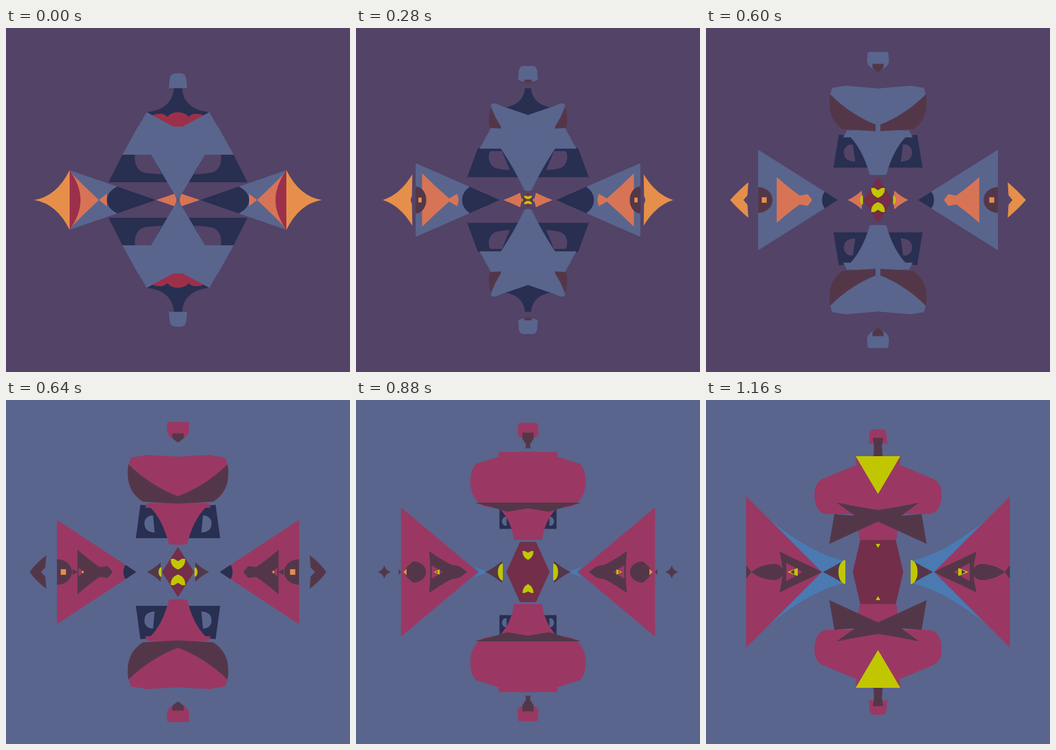
Write an HTML page with a canvas that moves like this. It is 600 by 600 pixels and loops after 1200 ms.

```html
<!DOCTYPE html>
<html>
<head>
<meta charset="utf-8">
<style>
html, body { margin: 0; width: 100%; height: 100%; overflow: hidden; background: #534367; }
canvas { display: block; width: 100vw; height: 100vh; }
</style>
</head>
<body>
<canvas id="stage" width="600" height="600"></canvas>
<script>
const ctx = document.getElementById('stage').getContext('2d');
const LOOP = 1200, STEP = 40, SWAP = 640, MID = 720, END = 1160;

const PURPLE = '#534367', BLUE = '#59658d', NAVY = '#282f51', CRIMSON = '#9c304b',
  ORANGE = '#e68f4b', SALMON = '#d77456', BROWN = '#533749', WINE = '#732e49',
  YELLOW = '#c0c700', SKY = '#4a7ab1', MAGENTA = '#9a3863';

let t = 0;
const clamp = k => Math.max(0, Math.min(1, k));
const mix = (a, b, k) => a + (b - a) * k;

// Value now, going from a through b at MID to c: slow start, slow end.
const m = (a, b, c) => t < MID
  ? mix(a, b, (t / MID) ** 1.4)
  : mix(b, c, 1 - (1 - (t - MID) / (END - MID)) ** 1.25);

// Fills a shape in all four quadrants; x, y run right and up from the centre.
// Two numbers make a line, four a quadratic and six a cubic curve.
function fill(color, ...parts) {
  ctx.fillStyle = color;
  for (const sx of [1, -1]) for (const sy of [1, -1]) {
    ctx.setTransform(sx, 0, 0, sy, 300, 300);
    ctx.beginPath();
    for (const p of parts) {
      if (p.length === 2) ctx.lineTo(...p);
      else if (p.length === 4) ctx.quadraticCurveTo(...p);
      else ctx.bezierCurveTo(...p);
    }
    ctx.fill();
  }
}
const tri = (color, tip, base, h) => fill(color, [tip, 0], [base, h], [base, 0]);
const round = (x, y, end) => [mix(x, end, .55), y, end, y * .55, end, 0];

function wings(main, flesh) {
  const k = clamp((t - MID) / (END - MID)) ** 2, root = mix(78, 60, k);
  fill(SKY, [root, 0], [root, 20 * k],
    [mix(82, 115, k), 32 * k, mix(82, 185, k), 88 * k], [mix(83, 98, k), 0]);

  const apex = m(38, 79, 98), base = m(189, 215, 230), h = m(52, 98, 132);
  tri(main, apex, base, h);
  const edge = Math.max(apex, m(106, 89, 85)), edgeH = h * (edge - apex) / (base - apex);
  const belly = Math.max(apex, m(124, 90, 85));
  fill(NAVY, [apex, 0], [edge, edgeH], [belly, edgeH * .6, belly, 0]);

  fill(flesh, [m(124, 112, 98), 0], [m(124, 122, 115), m(11, 10, 9)],
    [m(138, 136, 135), m(0, 10, 18)],
    [m(165, 153, 152), m(25, 20, 26), m(189, 173, 172), m(50, 37, 36)],
    [m(189, 173, 167), m(20, 18, 18), m(189, 173, 167), 0]);
  if (t >= SWAP) {
    tri(BROWN, 175, 184, 16 * clamp(1 - Math.abs(t - MID) / 120));
    tri(MAGENTA, m(170, 162, 132), m(170, 174, 160), m(0, 9, 16));
    tri(YELLOW, m(169, 169, 158), m(165, 165, 140), m(0, 3, 7));
    tri(BROWN, m(167, 167, 153), m(167, 167, 146), m(0, 0, 4));
  }
  eye(base);
}

function eye(base) {
  const rim = m(189, 215, 221), top = m(189, 215, 180), h = m(24, 22, 14);
  fill(BROWN, [rim, 0], [m(189, 215, 203), m(12, 11, 14), top, h], round(top, h, m(174, 187, 166)));
  tri(BROWN, m(189, 222, 221), m(189, 222, 230), m(0, 0, 12));

  const x0 = m(181, 198, 230), x1 = m(185, 208, 230);
  fill(ORANGE, [x0, 0], [x0, m(4, 5, 7)], [x1, Math.max(0, m(4, 5, -7))], [x1, 0]);

  const k = clamp(1 - t / 280), bulge = base - 19 * k;
  fill(CRIMSON, [base, 0], [base, 52 * k], [bulge, 25 * k, bulge, 0]);
}

function tips() {
  if (t <= MID) {
    const base = m(189, 237, 0);
    fill(t < SWAP ? ORANGE : BROWN, [m(189, 248, 0), 0], [m(189, 239, 0), 8], [base, m(52, 25, 0)],
      [m(212, 254, 0), m(6, 18, 0), m(251, 260, 0), 0]);
  } else {
    const x = m(0, 243, 261), r = m(0, 20, 1), q = r * .2;
    fill(BROWN, [x - r, 0], [x - q, q, x, r], [x + q, q, x + r, 0]);
  }
}

function core(flesh) {
  fill(flesh, [m(2, 34, 58), 0], [m(6, 35, 60), m(11, 18, 20)],
    [m(20, 42, 78), m(6, 8, 9), m(38, 57, 96), 0]);
  const x = m(0, 34, 57), h = m(0, 10, 21);
  fill(YELLOW, [x, 0], [x, h], round(x, h, m(0, 40, 69)));

  const top = m(0, 50, 56);
  fill(WINE, [0, 0], [0, top], [m(0, 1, 31), top], [m(0, 33, 44), 0]);
  const lobe = m(0, 27, 49);
  fill(YELLOW, [0, m(0, 22, 49)], [m(0, 8, 2), lobe], [m(4, 14, 4), lobe],
    [m(5, 15, 2), m(0, 11, 45), 0, m(0, 5, 42)]);
}

function grip() {
  fill(NAVY, [0, 195], [m(7, 0, 0), 195],
    [m(10, 2, 0), m(158, 190, 190), m(55, 0, 0), m(153, 185, 185)], [0, m(124, 185, 185)]);
  if (t < 280) {
    const y = 153 - t * .05;
    fill(CRIMSON, [0, y], [13, y, 18, y - 8], [26, y - 1, 34, y - 3], [42, y - 3, 48, y - 7], [0, y - 35]);
  }
}

function torso(main, back) {
  const wx = m(97, 50, 40), wy = m(79, 118, 90);
  const low = m(31, 64, 90), inner = m(17, 17, 20);
  fill(NAVY, [m(97, 60, 36), m(79, 124, 95)], [m(121, 65, 30), low], [inner, low], [inner, wy]);

  const hx = m(46, 43, 30), hy = m(79, 102, 90);
  fill(back, [hx, hy], [m(75, 43, 30), hy],
    [m(77, 57, 30), m(60, 100, 90), m(66, 57, 30), m(51, 88, 90)],
    [m(60, 57, 30), m(46, 74, 90), m(28, 43, 30), m(45, 73, 90)]);

  const top = m(128, 119, 102), foot = m(0, 56, 56);
  fill(main, [0, top], [m(70, 50, 46), top], [wx, wy], [m(47, 48, 36), m(79, 118, 82)],
    [m(24, 27, 34), m(40, 100, 70), m(2, 18, 32), m(3, 56, 56)], [0, foot]);
}

function chest(main) {
  const side = [m(57, 93, 111), m(149, 174, 134)];
  const hip = [m(63, 92, 110), m(139, 140, 104), m(70, 60, 90), m(127, 122, 101)];
  fill(main, [0, m(124, 215, 202)], [m(40, 60, 40), m(145, 215, 202)],
    [m(54, 62, 37), m(153, 212, 187)], [m(55, 87, 95), m(153, 208, 163)],
    [m(56, 93, 111), m(151, 195, 157), ...side], hip, [0, m(115, 118, 101)]);

  // The shaded band sags flat, then folds into crossed blades.
  if (t <= 880) {
    const sag = clamp((t - MID) / 160), to = (a, b) => mix(a, b, sag);
    const inner = Math.max(0, m(70, -15, -15));
    fill(BROWN, [inner, to(m(127, 133, 133), 121)],
      [m(62, 45, 45), to(m(140, 152, 152), 121), m(55, 92, 92), to(m(153, 194, 194), 121)],
      [to(m(56, 94, 94), 85), to(m(151, 185, 185), 118), to(side[0], 70), to(side[1], 115)],
      [to(hip[0], 50), to(hip[1], 109), to(hip[2], 37), to(hip[3], 105)],
      [inner, to(m(127, 118, 118), 111)]);
  } else {
    const k = (t - 880) / (END - 880), to = (a, b) => mix(a, b, k);
    fill(BROWN, [0, to(121, 108)], [to(45, 32), to(121, 113), to(92, 72), 121],
      [to(80, 40), to(116, 98)], [to(65, 76), to(113, 101)], [to(37, 85), to(105, 49)], [0, to(111, 88)]);
    fill(YELLOW, [0, to(207, 202)], [39 * k, to(207, 202)], [0, to(207, 136)]);
  }
}

function knob(main) {
  const top = m(221, 269, 249), low = m(195, 255, 223);
  fill(main, [0, top], [m(4, 20, 6), top], [m(15, 20, 15), top, m(15, 20, 15), m(206, 258, 238)],
    [m(16, 20, 16), low], [m(16, 18, 12), m(195, 244, 223), m(8, 8, 9), m(195, 238, 225)],
    [0, m(195, 234, 225)]);
  const roof = m(195, 250, 234), wall = m(195, 241, 219);
  fill(BROWN, [0, roof], [m(5, 11, 9), roof], [m(5, 11, 7), wall], [m(5, 1, 7), m(195, 232, 210)],
    [0, m(195, 232, 210)]);
  if (t > MID) {
    const neck = m(0, 228, 218), end = m(0, 226, 202);
    fill(BROWN, [0, neck], [m(0, 1, 7), neck], [m(0, 1, 8), end], [0, end]);
  }
}

function draw(now) {
  t = Math.floor(now % LOOP / STEP) * STEP;
  const first = t < SWAP;
  const back = first ? PURPLE : BLUE, main = first ? BLUE : MAGENTA, flesh = first ? SALMON : BROWN;
  ctx.setTransform(1, 0, 0, 1, 0, 0);
  ctx.fillStyle = back;
  ctx.fillRect(0, 0, 600, 600);
  wings(main, flesh);
  tips();
  core(flesh);
  grip();
  torso(main, back);
  chest(main);
  knob(main);
}

const start = performance.now();
function tick() {
  draw(performance.now() - start);
  requestAnimationFrame(tick);
}
tick();
</script>
</body>
</html>
```
